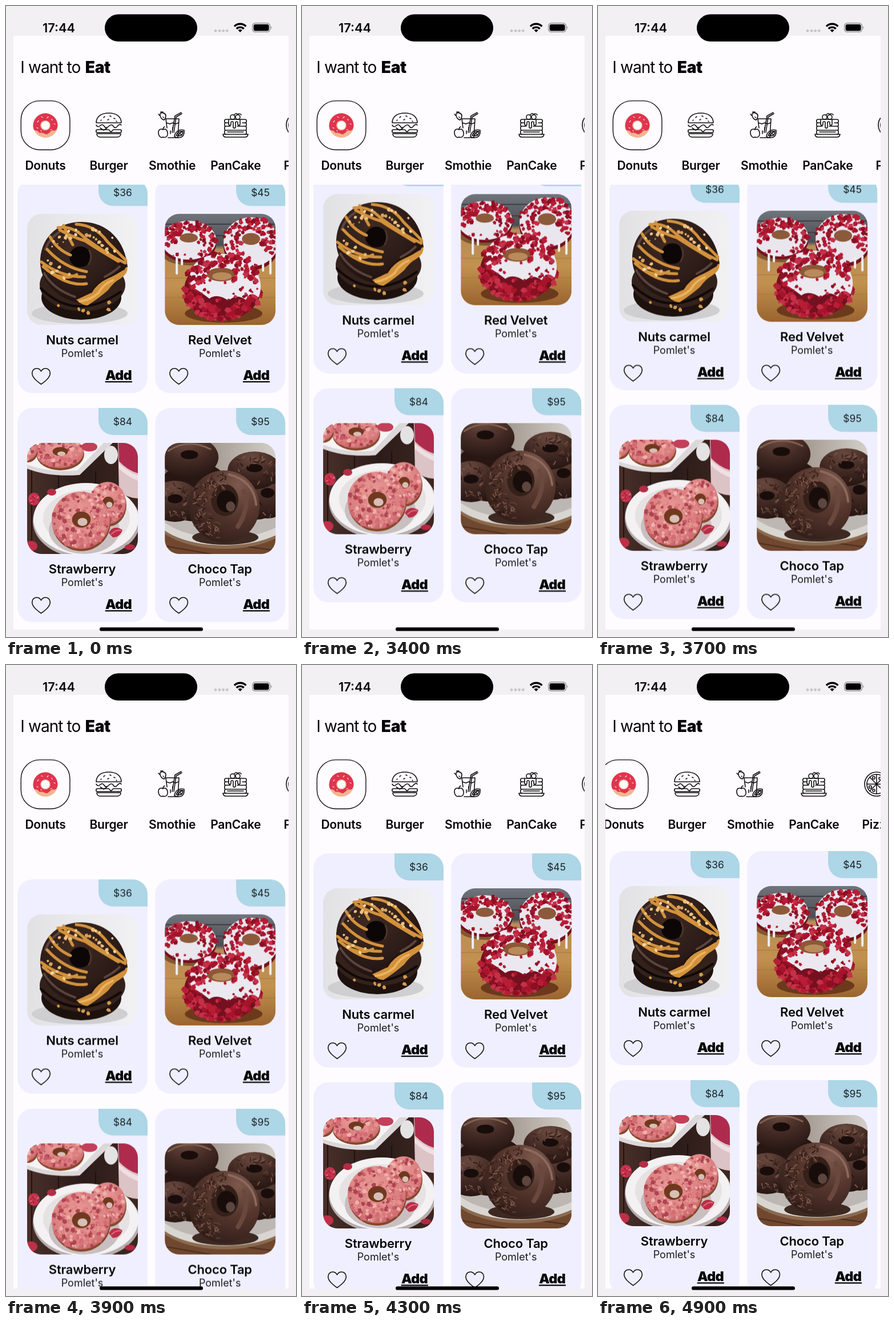
An HTML page for the animation above (5000 ms loop, 508x1102 px).

```html
<!DOCTYPE html>
<html lang="en">
<head>
<meta charset="utf-8">
<title>Donut menu</title>
<style>
html, body { margin: 0; width: 100%; height: 100%; overflow: hidden; background: #f2f0f3; }
svg { display: block; width: 100vw; height: 100vh; }
text { font-family: Inter, "Liberation Sans", sans-serif; fill: #050505; }
.mid { text-anchor: middle; }
.name { font-size: 22px; font-weight: 600; letter-spacing: -.2px; }
.brand { font-size: 18px; fill: #1b1b1e; }
.price { font-size: 17.5px; fill: #1c2226; }
.add { font-size: 23.5px; font-weight: 900; letter-spacing: -.7px; }
.label { font-size: 21px; font-weight: 600; letter-spacing: -.2px; }
.title { font-size: 28px; letter-spacing: -.9px; }
.title.strong { font-weight: 900; letter-spacing: -.3px; }
.line { fill: none; stroke: #111; stroke-width: 1.6; stroke-linecap: round; stroke-linejoin: round; }
.photo { filter: blur(.6px); }
#list { animation: list 5s step-end infinite; }
#tabs { animation: tabs 5s step-end infinite; }
@keyframes list {
  0% { transform: translateY(302px); }
  64% { transform: translateY(260.5px); }
  66% { transform: translateY(262.5px); }
  68% { transform: translateY(267.5px); }
  70% { transform: translateY(275px); }
  72% { transform: translateY(285px); }
  74% { transform: translateY(296.5px); }
  76% { transform: translateY(335px); }
  78% { transform: translateY(374.5px); }
  80% { transform: translateY(361px); }
  82% { transform: translateY(345px); }
  84% { transform: translateY(335px); }
  86% { transform: translateY(329px); }
  88% { transform: translateY(326.5px); }
  90%, 100% { transform: translateY(325px); }
}
@keyframes tabs {
  0% { transform: none; }
  98%, 100% { transform: translateX(-24px); }
}
</style>
</head>
<body>
<svg viewBox="0 0 508 1102" preserveAspectRatio="none">
  <defs>
    <clipPath id="panel"><rect x="13" y="52" width="482" height="1037"/></clipPath>
    <clipPath id="view"><rect x="13" y="312" width="482" height="777"/></clipPath>
    <clipPath id="frame"><rect width="194" height="194" rx="25"/></clipPath>
    <linearGradient id="paper"><stop stop-color="#e2e1e4"/><stop offset=".5" stop-color="#ebebed"/><stop offset="1" stop-color="#f1f0f2"/></linearGradient>
    <linearGradient id="wood" x2="0" y2="1"><stop stop-color="#70757c"/><stop offset=".28" stop-color="#4b4d52"/><stop offset=".32" stop-color="#b98c58"/><stop offset=".65" stop-color="#c2914f"/><stop offset="1" stop-color="#9a642f"/></linearGradient>
    <linearGradient id="plank"><stop stop-color="#4a302a"/><stop offset=".5" stop-color="#2c1c19"/><stop offset="1" stop-color="#3d2621"/></linearGradient>
    <linearGradient id="wall"><stop stop-color="#77685f"/><stop offset=".5" stop-color="#aaa199"/><stop offset="1" stop-color="#d3cfc9"/></linearGradient>
    <radialGradient id="dark" cx=".4" cy=".3" r=".75"><stop stop-color="#3f2a23"/><stop offset=".6" stop-color="#2d1c18"/><stop offset="1" stop-color="#1c100e"/></radialGradient>
    <radialGradient id="choco" cx=".7" cy=".2" r=".9"><stop stop-color="#7d594c"/><stop offset=".45" stop-color="#57382f"/><stop offset="1" stop-color="#2f1c17"/></radialGradient>
    <radialGradient id="shade" cx=".45" cy=".15" r=".9"><stop stop-color="#694a40"/><stop offset=".5" stop-color="#432a24"/><stop offset="1" stop-color="#231411"/></radialGradient>
    <radialGradient id="pink" cx=".45" cy=".35" r=".75"><stop stop-color="#e99b98"/><stop offset=".7" stop-color="#d87a7c"/><stop offset="1" stop-color="#b95b5e"/></radialGradient>
  </defs>

  <rect width="508" height="1102" fill="#f2f0f3"/>
  <rect x="13" y="52" width="482" height="1037" fill="#fffcff"/>

  <g clip-path="url(#view)"><g id="list"></g></g>

  <text class="title" x="25.3" y="117.3">I want to</text>
  <text class="title strong" x="138.8" y="117.3">Eat</text>

  <g clip-path="url(#panel)"><g id="tabs">
    <rect class="line" style="stroke-width:1.4" x="26.3" y="165.6" width="85.6" height="85.6" rx="33"/>
    <g id="labels"></g>

    <g transform="translate(69 208.5)">
      <circle r="21.5" fill="#f3b58f"/>
      <path d="M-21.5 1A21.5 21.5 0 0 1 21.5 0C21 7 18 10 14 9S8 13 4 15-4 12-8 13-12 9-16 9-21 7-21.5 1Z" fill="#e0344f"/>
      <circle r="8.8" fill="#f3b58f"/><circle r="7.3" fill="#fffcff"/>
      <g stroke="#ffd9dc" stroke-width="1.3" stroke-linecap="round">
        <path d="M-14-6l2-2M-7-15l2 1M3-13l2-2M11-11l1 2M15-3l2 1M-15 4l2 1M-8 9l1 1M9 8l2-1"/>
      </g>
    </g>

    <g class="line" transform="translate(180 208)">
      <path d="M-22-4c0-11 9-17 22-17s22 6 22 17zM-22-4h44M-9-13l2-2M-2-9l2-1M2-16l2 1M9-12l2 1M-14-8l1-1M13-7l1 1"/>
      <path d="M-22 0q3 5 7 1t7 1 8 0 8 0 7 0 7-2M-15 5l6 4 6-4M-20 8c-3 0-3 5 0 5h40c3 0 3-5 0-5H8l-4 4-4-4h-20"/>
      <path d="M-21 15h42c0 4-3 6-6 6h-30c-3 0-6-2-6-6z"/>
    </g>

    <g class="line" transform="translate(290 208)">
      <path d="M-10-11H13L11 22H-6M-10-11L-8 5M-9-4l6 2 5-2 5 2 5-2M1 13L6-16 17-22M4 13L8-14 18-20"/>
      <path d="M-20-20c3-3 9-1 10 3 0 4-1 6-3 8-4 0-8-6-7-11zM-21-17l-2-2M-18-21l-1-2 4 0M-15-14l1 1"/>
      <path d="M-15 8c-3-2-8-1-8 5s4 10 8 8c5 2 9-2 8-8s-5-7-8-5zM-15 8q0-4 3-5"/>
      <path d="M5 20A13 13 0 0 1 22 9Q23 22 12 22 8 22 5 20zM8 18A10 10 0 0 1 20 11Q20 19 12 19zM12 19l2-5 6-3M14 14l4 4M2 4v4M-2 10v5"/>
    </g>

    <g class="line" transform="translate(402 208)">
      <path d="M-22 16h44q-1 5-5 5h-34q-4 0-5-5zM-17-10h34c3 0 3 6 0 6M-17-10c-3 0-3 6 0 6"/>
      <path d="M-17-4h5M17-4H12M-17-4c-3 0-3 6 0 6h8M17-4c3 0 3 6 0 6H3M-17 2c-3 0-3 7 0 7h34c3 0 3-7 0-7M-17 9c-3 0-3 7 0 7M17 9c3 0 3 7 0 7M-14 12h28"/>
      <path d="M-12-10v9q2 3 4 0v-4q2-3 4 0v9q2 3 4 0V-5q2-2 4 0v4q2 3 4 0v-9"/>
      <circle cx="-5" cy="-14" r="4"/><circle cx="4" cy="-14" r="4"/><path d="M-2-18q3-4 6-1 4-2 6 1"/>
    </g>

    <g class="line" transform="translate(512 208)">
      <circle r="21"/><circle r="17"/>
      <path d="M0-17V17M-17 0H17M-12-12L12 12M12-12L-12 12"/>
      <g fill="#fffcff"><circle cx="-5" cy="-11" r="2.3"/><circle cx="-11" cy="5" r="2.3"/><circle cx="-5" cy="11" r="2"/><circle cx="6" cy="-10" r="2"/><circle cx="10" cy="5" r="2.3"/></g>
    </g>
  </g></g>

  <text class="mid" x="92.5" y="45.8" font-size="21.8" font-weight="600">17:44</text>
  <rect x="173" y="14.5" width="162" height="47.5" rx="23.75"/>
  <g fill="#c6c4c8"><circle cx="367" cy="43.3" r="2.4"/><circle cx="374" cy="43.3" r="2.4"/><circle cx="380.6" cy="43.3" r="2.4"/><circle cx="387.3" cy="43.3" r="2.4"/></g>
  <g fill="none" stroke="#000" stroke-width="3.4">
    <path d="M400 35.6a14.3 14.3 0 0 1 20.4 0M403.8 39.8a9 9 0 0 1 12.8 0"/>
    <path d="M410.2 46l-3.6-3.8a5 5 0 0 1 7.2 0z" fill="#000" stroke="none"/>
  </g>
  <rect x="431.6" y="30" width="31" height="15.4" rx="5" fill="none" stroke="#918f93" stroke-width="1.3"/>
  <rect x="433.6" y="32" width="27" height="11.4" rx="3.2"/>
  <path d="M464 35q2.4 2.7 0 5.4z" fill="#918f93"/>
  <rect x="164" y="1085.3" width="181" height="6.2" rx="3.1"/>
</svg>

<script>
let seed = 11;
const rand = (a = 0, b = 1) => {
  seed = (seed * 16807) % 2147483647;
  return a + (b - a) * seed / 2147483647;
};
const pick = list => list[Math.floor(rand(0, list.length))];
const oval = (x, y, rx, ry, fill) =>
  `<ellipse cx="${x}" cy="${y}" rx="${rx}" ry="${ry}" fill="${fill}"/>`;
const path = (d, fill, stroke = 'none', width = 0) =>
  `<path d="${d}" fill="${fill}" stroke="${stroke}" stroke-width="${width}" stroke-linecap="round"/>`;
const back = fill => `<rect width="194" height="194" fill="${fill}"/>`;

// Scatter bits over a ring, from an inner share to the rim, inside an angle range.
function scatter(n, x, y, rx, ry, colours, draw, inner = .45, from = 0, to = 6.283) {
  let out = '';
  for (let i = 0; i < n; i++) {
    const a = rand(from, to), r = Math.sqrt(rand(inner * inner, 1));
    out += draw(x + rx * r * Math.cos(a), y + ry * r * Math.sin(a), pick(colours));
  }
  return out;
}
// A rough five-cornered lump.
const crumb = size => (x, y, c) => {
  const s = rand(size * .4, size), turn = rand(0, 6);
  const corners = [0, 1, 2, 3, 4].map(i => {
    const a = turn + i * 1.257, r = s * rand(.7, 1.2);
    return `${(x + r * Math.cos(a)).toFixed(1)} ${(y + r * Math.sin(a)).toFixed(1)}`;
  });
  return path(`M${corners.join('L')}Z`, c);
};
const stick = (x, y, c) => {
  const a = rand(0, 3.14);
  return path(`M${x.toFixed(1)} ${y.toFixed(1)}l${(6 * Math.cos(a)).toFixed(1)} ${(6 * Math.sin(a)).toFixed(1)}`, 'none', c, 2);
};

const reds = ['#a5142b', '#b81d36', '#8c0f22', '#c53049'];
const pinks = ['#c65a64', '#efb0aa', '#d46c74', '#e5928f', '#ad4450', '#dc8585'];

function caramel() {
  const gold = '#d2913c', nuts = ['#ecc27e', '#d8a55c', '#f2d7a5'];
  return back('url(#paper)') + oval(92, 174, 84, 18, '#cfced1') +
    oval(95, 146, 70, 39, '#1d110e') + oval(97, 124, 75, 46, '#33211c') +
    path('M24 130Q85 190 164 136', 'none', '#110908', 4) +
    path('M23 86C22 45 50 14 95 14 142 14 172 48 176 93L158 108 122 130 112 157C66 158 25 128 23 86Z', 'url(#dark)') +
    path('M30 104Q46 132 84 145M32 62Q38 44 56 32M136 110Q152 102 162 92', 'none', '#5b443d', 4) +
    path('M86 150Q98 145 112 138 120 122 138 114 160 106 175 92 178 104 162 114 152 119 142 133 126 147 106 160 96 160 86 150Z', gold) +
    path('M92 153Q112 150 125 138 134 122 150 116', 'none', '#eab35f', 4) +
    path('M112 137Q122 120 140 112L170 96', 'none', '#23130e', 3) +
    oval(93, 75, 19, 18, '#0c0706') + path('M108 88Q115 76 109 64', 'none', '#4d352d', 3) +
    path('M36 99Q64 118 87 106M25 84Q60 111 101 110M35 62Q64 94 104 101M40 40Q52 62 76 72M28 92Q70 128 104 122', 'none', gold, 5) +
    path('M54 24Q80 20 101 42 139 70 172 86M57 28Q78 40 101 47 127 64 160 83M86 18Q120 20 141 49 156 64 173 81M64 20Q72 40 80 54', 'none', gold, 5) +
    scatter(36, 98, 78, 68, 56, nuts, crumb(4), .6, 2.2, 6.2) +
    scatter(8, 102, 144, 62, 32, ['#d49a4c'], crumb(5), .7, .2, 2.8);
}

function velvetRing(x, y, rx, ry, n) {
  return oval(x, y + ry * .2, rx, ry * .95, '#74101f') + oval(x, y, rx, ry, '#e9e6ee') +
    scatter(n, x, y - ry * .1, rx, ry * .9, reds, crumb(6), .4, 2.6, 7) +
    scatter(n / 4, x, y, rx, ry, reds, crumb(5), .5) +
    oval(x, y - ry * .12, rx * .33, ry * .24, '#8c5a3a');
}

function velvet() {
  return back('url(#wood)') +
    path('M0 18H194M0 38H194', 'none', '#3c3e43', 2) +
    path('M0 112H194M0 146H194M0 174H194', 'none', '#a87439', 1) +
    oval(46, 74, 48, 16, '#80572f') + velvetRing(42, 46, 48, 34, 75) +
    path('M21 76v28M30 76v12', 'none', '#f1edf0', 4) +
    velvetRing(151, 49, 48, 43, 85) +
    path('M172 82v17M185 80v24', 'none', '#f1edf0', 4) +
    oval(103, 174, 68, 16, '#6b3a1c') + oval(101, 132, 67, 53, '#74101f') +
    scatter(130, 101, 134, 68, 52, reds, crumb(7), .6, 0, 3.6) +
    path('M44 100Q60 68 104 70 150 72 164 108 172 128 164 146 150 132 142 150 124 138 112 152 92 138 78 148 60 134 48 128 40 116 44 100Z', '#ebe8f0') +
    scatter(95, 101, 108, 62, 40, reds, crumb(6.5), .5, 2.6, 6.6) +
    scatter(18, 105, 128, 58, 24, reds, crumb(4), .5, 0, 3) +
    oval(99, 106, 25, 12, '#8d5836') + oval(100, 109, 17, 7, '#b98a5b') +
    scatter(22, 99, 106, 29, 17, reds, crumb(5), .85);
}

function pinkRing(x, y, rx, ry, n) {
  return oval(x + 1, y + 4, rx, ry, '#84482a') + oval(x, y, rx, ry, 'url(#pink)') +
    scatter(n, x, y, rx * .96, ry * .96, pinks, crumb(5), .35) +
    oval(x + 1, y - 1, rx * .32, ry * .28, '#70391f') + oval(x + 3, y + 3, rx * .17, ry * .14, '#d8bfb6');
}

function berry() {
  return back('url(#plank)') + path('M55 58V194M120 50V90M8 0V194', 'none', '#1e1210', 2) +
    path('M0 45Q38 60 92 56L150 0H0Z', '#dcd7d8') + path('M0 38Q42 53 88 48L134 0H0Z', '#f6f3f4') +
    pinkRing(57, 16, 42, 28, 90) + pinkRing(0, 10, 18, 20, 25) + oval(109, 7, 14, 8, '#c2405a') +
    oval(147, 21, 12, 16, '#e4e2e3') +
    path('M159 0H194V97Q174 96 161 84Z', '#dcc3c6') + path('M160 0H194V53Q176 48 161 32Z', '#ae2b4d') +
    path('M161 36Q179 52 194 57V66Q174 58 161 45Z', '#efdfe3') +
    oval(104, 137, 94, 65, '#b5acad') + oval(103, 133, 92, 63, '#f3f1f2') + oval(104, 132, 76, 50, '#e6e2e4') +
    oval(100, 152, 62, 42, '#c9bfc0') +
    pinkRing(141, 105, 32, 37, 100) + pinkRing(94, 135, 51, 50, 220) +
    path('M143 157q8-15 24-5-4 13-17 13z', '#b92d47') + path('M148 159q8-8 16-6', 'none', '#e0707e', 2) +
    oval(12, 98, 10, 11, '#c4324c') + oval(43, 86, 8, 6, '#b52d45') +
    oval(7, 180, 11, 9, '#bf3048') + oval(180, 182, 9, 5, '#b22840') +
    scatter(14, 12, 98, 8, 9, ['#e3647a', '#a01f39'], crumb(2.4), 0);
}

function chocoRing(x, y, rx, ry) {
  return oval(x, y, rx, ry, 'url(#shade)') + oval(x, y - ry * .12, rx * .3, ry * .22, '#190d0b');
}

function chocolate() {
  const bits = ['#2e1914', '#7b5749', '#40261f', '#5f3f34'];
  return back('url(#wall)') + path('M0 138H194V194H0Z', '#70482f') +
    path('M0 180L80 194M100 175L194 188', 'none', '#4a2d1f', 2) +
    oval(104, 123, 128, 62, '#8a6a50') + oval(104, 119, 127, 60, '#d9d6d2') + oval(104, 112, 120, 54, '#bdb7b3') +
    oval(52, 85, 64, 52, '#281612') + oval(160, 88, 48, 46, '#281612') +
    chocoRing(18, 102, 44, 36) + scatter(60, 18, 102, 42, 33, bits, stick, .45) +
    chocoRing(43, 25, 51, 36) + path('M6 14Q40-9 80 11', 'none', '#80604f', 3) +
    chocoRing(180, 92, 40, 40) + scatter(20, 180, 92, 36, 36, bits, stick, .5) +
    chocoRing(157, 48, 47, 33) + scatter(45, 157, 48, 44, 28, bits, stick, .45) +
    oval(106, 165, 58, 13, '#3d2922') + oval(104, 111, 62, 63, 'url(#choco)') +
    path('M112 55Q156 66 160 108', 'none', '#8c695c', 4) + path('M138 84Q150 112 128 146', 'none', '#6a483d', 8) +
    oval(105, 100, 24, 28, '#35201a') + oval(108, 102, 17, 19, '#180d0a') + oval(115, 111, 8, 9, '#5d463e') +
    scatter(120, 103, 111, 58, 59, bits, stick, .5, 1.8, 4.8);
}

const heart = 'M41.5 358.6C35 353.8 25.7 347 25.7 339.2C25.7 334 29.6 331 33.6 331C37.2 331 40 333 41.5 336C43 333 45.8 331 49.4 331C53.4 331 57.3 334 57.3 339.2C57.3 347 48 353.8 41.5 358.6Z';

const card = ([name, price, photo], i) => `
  <g transform="translate(${20 + (i % 2) * 241.2} ${400 * (i >> 1)})">
    <rect width="228" height="374" rx="26" fill="#f0efff"/>
    <path d="M142 0H202A26 26 0 0 1 228 26V47.3H168A26 26 0 0 1 142 21.3Z" fill="#add6e6"/>
    <text class="price mid" x="184.4" y="30">${price}</text>
    <g transform="translate(17 61)" clip-path="url(#frame)"><g class="photo">${photo()}</g></g>
    <text class="name mid" x="113.5" y="288.7">${name}</text>
    <text class="brand mid" x="113.5" y="311">Pomlet's</text>
    <path class="line" d="${heart}"/>
    <text class="add mid" x="177" y="351">Add</text>
    <rect x="153.7" y="353.2" width="47.2" height="2.2"/>
  </g>`;

document.getElementById('list').innerHTML = [
  ['Nuts carmel', '$36', caramel],
  ['Red Velvet', '$45', velvet],
  ['Strawberry', '$84', berry],
  ['Choco Tap', '$95', chocolate],
].map(card).join('');

document.getElementById('labels').innerHTML = ['Donuts', 'Burger', 'Smothie', 'PanCake', 'Pizza']
  .map((t, i) => `<text class="label mid" x="${69 + i * 111.1}" y="285.6">${t}</text>`).join('');
</script>
</body>
</html>
```
